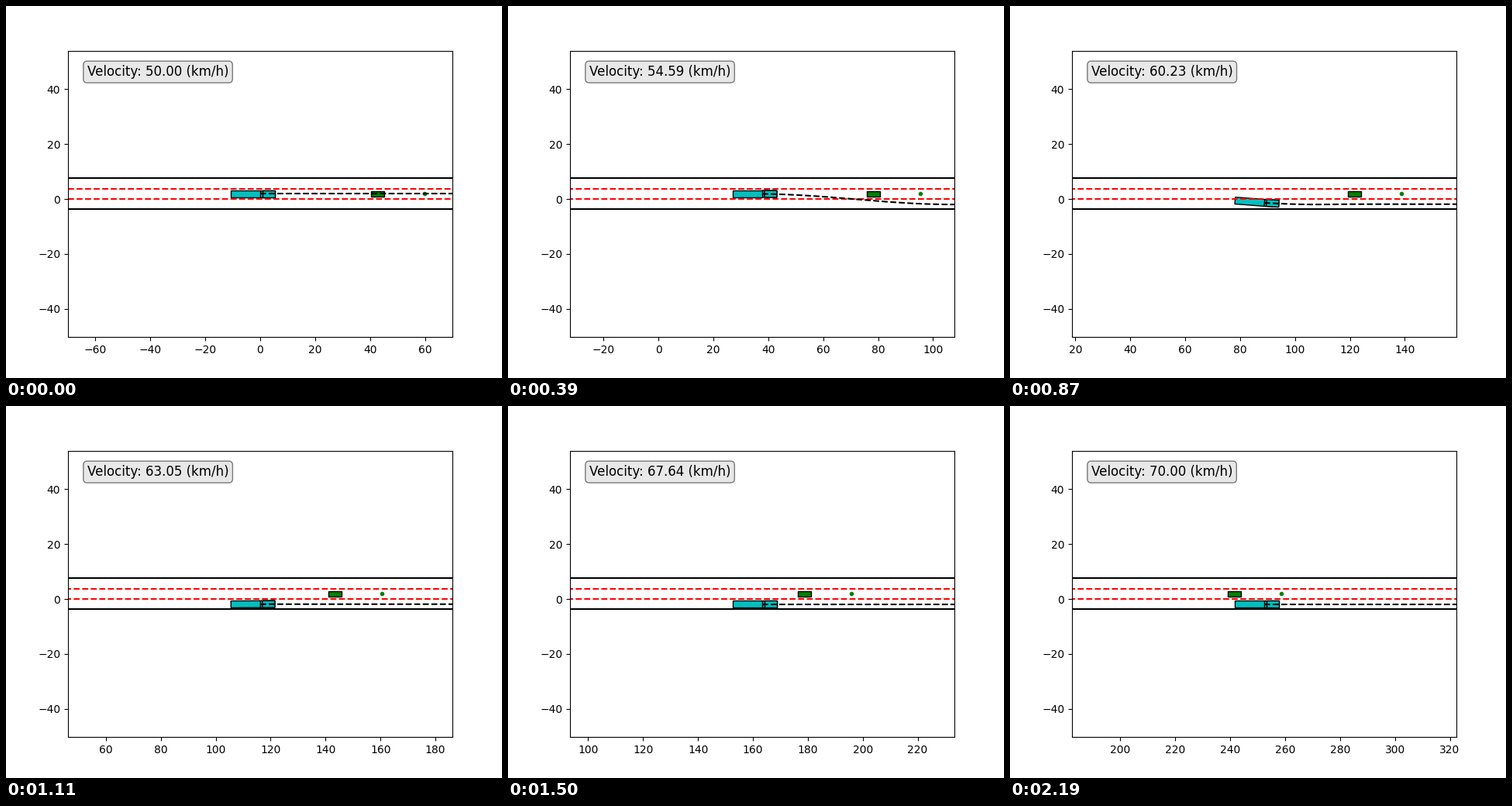
A matplotlib script that plays this animation: 640x480 px, repeating every 2.22 s.

```python
import numpy as np
import matplotlib.pyplot as plt
from matplotlib.animation import FuncAnimation
from matplotlib.patches import Polygon

FRAMES, INTERVAL = 74, 30
DT = 0.2                        # simulated seconds per frame
LANE = 3.75
CENTER, SIDE = LANE / 2, -LANE / 2
V_START, V_END, ACCEL = 50 / 3.6, 70 / 3.6, 0.49
LEAD_SPEED, LEAD_START = 49 / 3.6, 59.85
REPLAN_FRAME = 12
TURN_START, TURN_END, SETTLE_END = 35.0, 108.0, 119.0
OVERSHOOT = -2.0
VIEW = 70.0
HALF_HEIGHT = VIEW * 369.6 / 496


def ego_state(frame):
    t = frame * DT
    ramp = min(t, (V_END - V_START) / ACCEL)
    x = V_START * ramp + ACCEL * ramp ** 2 / 2 + V_END * (t - ramp)
    return x, V_START + ACCEL * ramp


def ease(x, start, end):
    u = np.clip((x - start) / (end - start), 0, 1)
    return (1 - np.cos(np.pi * u)) / 2


def lane_change(x):
    y = CENTER + (OVERSHOOT - CENTER) * ease(x, TURN_START, TURN_END)
    return y + (SIDE - OVERSHOOT) * ease(x, TURN_END, SETTLE_END)


def heading(x):
    return np.arctan(lane_change(x + 0.5) - lane_change(x - 0.5))


def box(x, y, angle, rear, front, width):
    """Corners of a rectangle reaching from rear to front of its pivot."""
    w = width / 2
    local = np.array([[rear, -w], [front, -w], [front, w], [rear, w]])
    c, s = np.cos(angle), np.sin(angle)
    return local @ np.array([[c, s], [-s, c]]) + (x, y)


fig, ax = plt.subplots(figsize=(6.4, 4.8), dpi=100)
ax.set_ylim(CENTER - HALF_HEIGHT, CENTER + HALF_HEIGHT)

for lane, style in ((-1, "k-"), (0, "r--"), (1, "r--"), (2, "k-")):
    ax.plot([-VIEW, 500], [lane * LANE] * 2, style)


def add_body(color):
    return ax.add_patch(Polygon(np.zeros((4, 2)), facecolor=color,
                                edgecolor="k", lw=1))


lead, tractor, cab, trailer = [add_body(c) for c in "gccc"]
lead_dot, = ax.plot([], [], "g.")
path, = ax.plot([], [], "k--")
label = ax.text(0.05, 0.95, "", transform=ax.transAxes, fontsize=12, va="top",
                bbox=dict(boxstyle="round", facecolor="lightgray", alpha=0.5))


def update(frame):
    x, speed = ego_state(frame)
    y = lane_change(x)
    ax.set_xlim(x - VIEW, x + VIEW)

    angle = heading(x)
    tractor.set_xy(box(x, y, angle, 0, 5.35, 2.5))
    cab.set_xy(box(x, y, angle, 0.8, 5.35, 2.5))
    trailer.set_xy(box(x, y, heading(x - 7), -10.65, 0.1, 2.5))

    lead_x = LEAD_START + LEAD_SPEED * DT * frame
    lead.set_xy(box(lead_x, CENTER, 0, -19.5, -14.65, 2.0))
    lead_dot.set_data([lead_x], [CENTER])

    xs = np.linspace(x, x + 80, 161)
    ys = lane_change(xs) if frame >= REPLAN_FRAME else np.full_like(xs, CENTER)
    path.set_data(xs, ys)
    label.set_text(f"Velocity: {speed * 3.6:.2f} (km/h)")
    return lead, tractor, cab, trailer, lead_dot, path, label


anim = FuncAnimation(fig, update, frames=FRAMES, interval=INTERVAL,
                     repeat=True, repeat_delay=0, blit=False)
plt.show()
```
